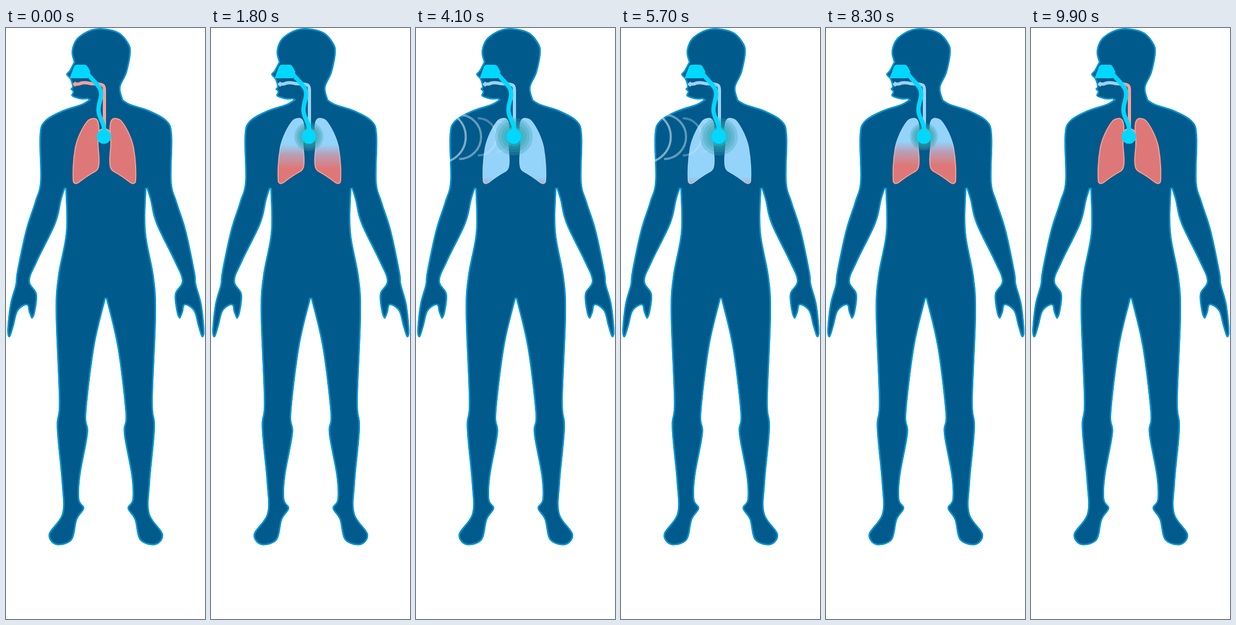
An HTML page for the animation above (10 s loop, 370 by 1094 pixels).

```html
<!DOCTYPE html>
<html lang="en">
<head>
<meta charset="utf-8">
<title>Breathing</title>
<style>
html, body { margin: 0; width: 100%; height: 100%; overflow: hidden; background: #fff; }
svg { display: block; width: 100%; height: 100%; }
</style>
</head>
<body>
<svg viewBox="0 0 370 1094">
  <defs>
    <linearGradient id="air" gradientUnits="userSpaceOnUse" x1="114" y1="114" x2="185" y2="185">
      <stop stop-color="#9ad3f8"/><stop stop-color="#ff9f98"/>
    </linearGradient>
    <linearGradient id="fill" gradientUnits="userSpaceOnUse" x1="0" y1="140" x2="0" y2="340">
      <stop stop-color="#94d3fa"/><stop stop-color="#b8a0b8"/><stop stop-color="#de7878"/>
    </linearGradient>
    <linearGradient id="edge" gradientUnits="userSpaceOnUse" x1="0" y1="140" x2="0" y2="340">
      <stop stop-color="#9cd5f9"/><stop stop-color="#cfb4bd"/><stop stop-color="#ff9f90"/>
    </linearGradient>
    <clipPath id="inside"><path class="body"/></clipPath>
    <path id="lung" d="M162 167.500C168 166.500 171 171 172 178C174 188 171 200 171 212C171 224 173 232 173 245C173 256 172 262 165 266C154 272 144 279 135 286C129 290 125 287 125 282C124 262 126 238 129 221C133 202 143 183 151 173C154 169 158 168 162 167.500Z"/>
  </defs>
  <path class="body" fill="#005a8c" stroke="#0096d2" stroke-width="5.500" clip-path="url(#inside)"/>
  <g fill="none" stroke="url(#air)">
    <path d="M128 104L136 103.500C143 100 150 101 158 103C168 104 176 103 180 106Q183 108 183 115V190" stroke-width="6"/>
    <path d="M170 193Q182 181 195 193" stroke-width="3"/>
    <path d="M123.500 104L128.500 99L133.500 104L128.500 109Z" fill="url(#air)" stroke="none"/>
  </g>
  <g fill="url(#fill)" stroke="url(#edge)" stroke-width="2">
    <use href="#lung"/>
    <use href="#lung" transform="translate(366 0) scale(-1 1)"/>
  </g>
  <g id="arcs" clip-path="url(#inside)" fill="none" stroke="#d9e6ee" stroke-width="4"></g>
  <g id="halo" fill="#359fa9" fill-opacity=".3"></g>
  <circle id="glow" cx="182" cy="201" r="18" fill="#00d4f5"/>
  <g fill="#00d8ff">
    <path d="M118.500 93L126 72Q128 68 132 68H146Q150 68 152 72L157 81L152 93Z"/>
    <path d="M151 83C158 95 169 101 175 113C181 127 171 138 172 153C173 169 183 173 183 192" fill="none" stroke="#00d8ff" stroke-width="8"/>
    <circle cx="182" cy="201" r="13.300"/>
  </g>
</svg>
<script>
const LOOP = 10000, STEP = 100, AXIS = 185.7;
const $ = s => document.querySelector(s);
const clamp = v => Math.max(0, Math.min(1, v));
const points = s => s.split(" ").map(p => p.split(",").map(Number));

// Key points; the limbs are given for one side and mirrored.
const face = points("152,132 138,132 122,126 124,118 120,113 123,108 119,95 112,86 118,78 126,63");
const skull = points("126,63 122,43 131,20 155,4 180,0.5 210,8 228,28 232,46 225,82 213,110 218,133");
const arm = points("218,133 232,141 268,153 300,172 309,200 308,284 318,322 335,375 351,450 354,475 364,512 369,562 364,572 357,552 349,524 333,513 329,526 323,538 317,525 314,492 327,468 313,432 279,362 268,318 261,296");
const leg = points("261,296 260,377 275,460 279,530 273,690 277,740 268,840 267,898 292,937 278,957 249,948 239,910 226,889 235,872 233,828 219,750 222,712 207,590 185.7,500");
const mirror = part => part.map(([x, y]) => [2 * AXIS - x, y]).reverse();

// Catmull-Rom spline as cubic Béziers
function smooth(p) {
  let d = "";
  for (let i = 0; i < p.length - 1; i++) {
    const a = p[Math.max(0, i - 1)], b = p[i], c = p[i + 1], e = p[Math.min(p.length - 1, i + 2)];
    const h1 = b.map((v, k) => v + (c[k] - a[k]) / 6);
    const h2 = c.map((v, k) => v - (e[k] - b[k]) / 6);
    d += `C${h1} ${h2} ${c}`;
  }
  return d;
}

const outline = `M${face[0]}` + [face, skull, arm, leg, mirror(leg), mirror(arm)].map(smooth).join("") + "Z";
document.querySelectorAll(".body").forEach(el => el.setAttribute("d", outline));

function add(parent, tag, attrs) {
  const el = document.createElementNS("http://www.w3.org/2000/svg", tag);
  for (const k in attrs) el.setAttribute(k, attrs[k]);
  return parent.appendChild(el);
}

const rings = [4, 3, 2, 1].map(() => add($("#halo"), "circle", { cx: 182, cy: 201 }));

// Waves grow and brighten as they move away from the lungs.
const waves = [0, 1, 2, 3].map(i => {
  const x = 150 - 35 * i, r = 28 + 6.5 * i;
  return add($("#arcs"), "path", { d: `M${x} ${201.5 - r}a${r} ${r} 0 0 1 0 ${2 * r}` });
});

function setStops(id, offsets) {
  offsets.forEach((v, i) => $(id).children[i].setAttribute("offset", clamp(v)));
}

function draw(t) {
  // breathing out retraces breathing in
  const p = Math.min(t, LOOP - t);

  const air = (0.55 * p - 10) / 142;
  setStops("#air", [air - 0.06, air + 0.06]);

  const left = 1 - clamp((p - 700) / 2400);
  const front = p < 500 ? 100 : 294 - 126 * left ** 1.2;
  const stops = [-18, 0, 26].map(off => (front + off - 140) / 200);
  setStops("#fill", stops);
  setStops("#edge", stops);

  const spread = 23 * clamp((p - 500) / 2000);
  rings.forEach((c, i) => c.setAttribute("r", 12 + spread * (4 - i) / 4));
  $("#halo").setAttribute("opacity", clamp((p - 500) / 600));
  $("#glow").setAttribute("opacity", 0.3 * clamp((p - 2500) / 400));

  waves.forEach((w, i) => w.setAttribute("opacity", (0.2 + 0.13 * i) * clamp((p - 2550 - 95 * i) / 300)));
}

const began = performance.now();
function tick() {
  const t = (performance.now() - began) % LOOP;
  draw(Math.floor(t / STEP) * STEP);
  requestAnimationFrame(tick);
}
tick();
</script>
</body>
</html>
```
